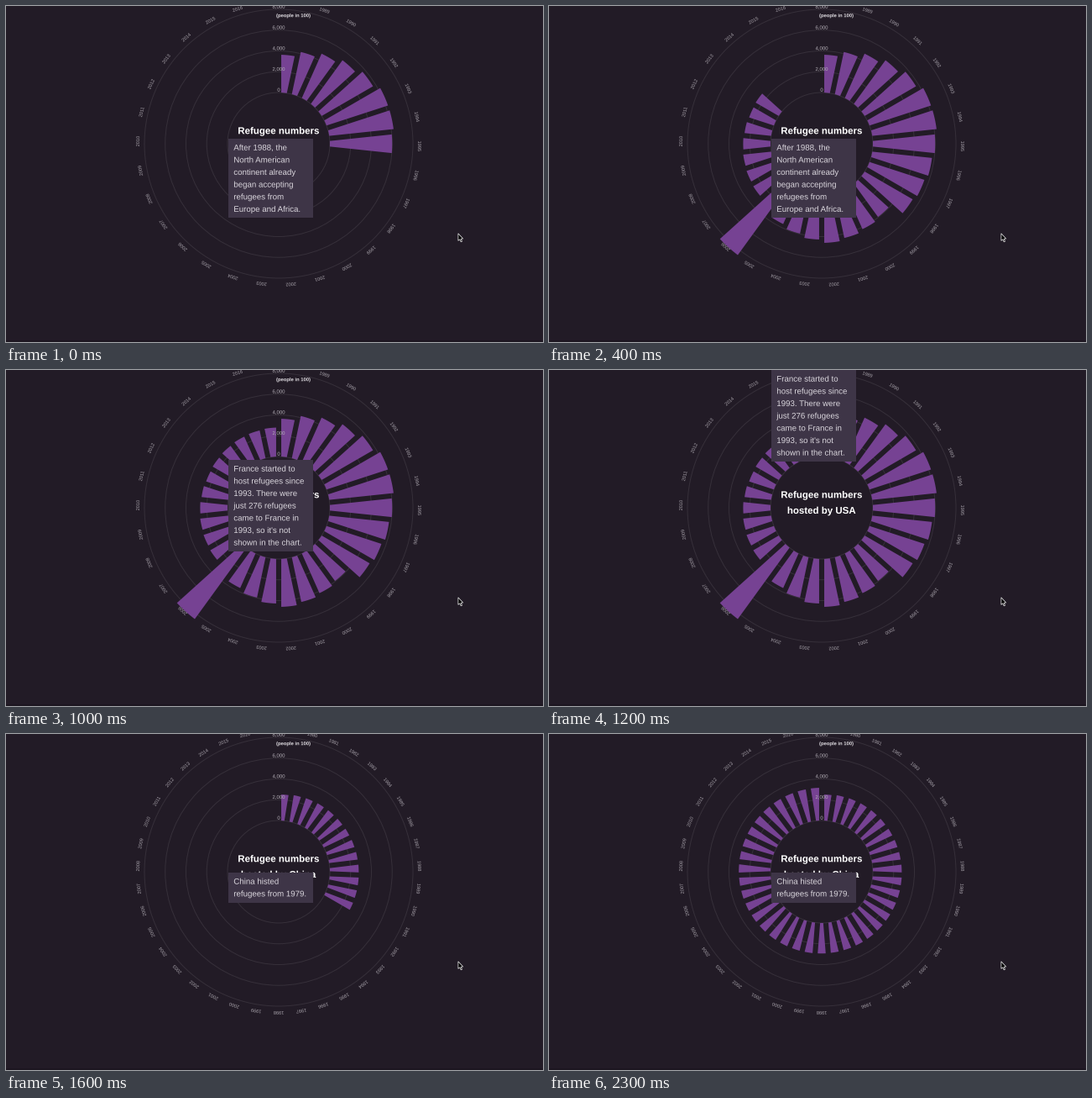
A matplotlib script that plays this animation: 640x400 px, repeating every 2400 ms.

```python
import numpy as np
import matplotlib.pyplot as plt
from matplotlib.animation import FuncAnimation
from matplotlib.patches import Circle, PathPatch, Polygon, Rectangle
from matplotlib.textpath import TextPath
from matplotlib.transforms import Affine2D

W, H, DPI = 640, 400, 100
FRAMES, STEP = 24, 100
SWITCH = 13                      # step at which the second chart takes over
RATE = 4.5                       # bars added per step
CX, CY = 325, 164
INNER, OUTER = 61, 160
PAD = 3.05                       # half the gap between neighbouring bars

BG, PURPLE, PANEL = "#221b26", "#764293", "#3e3547"

fig = plt.figure(figsize=(W / DPI, H / DPI), dpi=DPI, facecolor=BG)
ax = fig.add_axes([0, 0, 1, 1])
ax.set_xlim(0, W)
ax.set_ylim(H, 0)
ax.axis("off")


def px(n):
    return n * 72 / DPI


def polar(a, r):
    """Stage position for a clockwise angle from twelve o'clock."""
    return CX + r * np.sin(a), CY - r * np.cos(a)


def label(x, y, s, size, color, z, weight="normal", angle=0, left=False,
          move=Affine2D()):
    """Text as outlines, so that it can sit and turn between whole pixels."""
    path = TextPath((0, 0), s, size=size,
                    prop={"family": "Liberation Sans", "weight": weight})
    box = path.get_extents()
    shift = 0 if left else -(box.x0 + box.x1) / 2
    place = Affine2D().translate(shift, 0).scale(1, -1).rotate(angle)
    place.translate(x, y)
    return ax.add_patch(PathPatch(path, fc=color, lw=0, zorder=z,
                                  transform=place + move + ax.transData))


def bar(a0, a1, r):
    edge = []
    for rad, flip in ((INNER, 1), (r, -1)):
        pad = np.arcsin(PAD / rad)
        edge.append(np.column_stack(
            polar(np.linspace(a0 + pad, a1 - pad, 8)[::flip], rad)))
    return ax.add_patch(Polygon(np.vstack(edge), fc=PURPLE, lw=0, zorder=2))


class Chart:
    def __init__(self, country, first, radii, shift):
        band = 2 * np.pi / len(radii)
        self.bars = [bar(i * band, (i + 1) * band, r)
                     for i, r in enumerate(radii)]
        self.fixed = [label(CX, 171, f"hosted by {country}", 11.5, "white", 5,
                            weight="bold")]
        for i in range(len(radii)):
            a = (i + 0.5) * band + np.radians(shift)
            self.fixed.append(label(*polar(a, 166), str(first + i), 5.6,
                                    "#a6a1a9", 4, angle=a))

    def show(self, on, count):
        for art in self.fixed:
            art.set_visible(on)
        for i, b in enumerate(self.bars):
            b.set_visible(on and i < count)


class Note:
    LINE = 14.65

    def __init__(self, offset, text):
        self.offset = offset
        self.move = Affine2D()
        lines = text.split("\n")
        ax.add_patch(Rectangle(
            (265, 0), 101, len(lines) * self.LINE + 6.3, fc=PANEL, lw=0,
            zorder=6, transform=self.move + ax.transData))
        for i, s in enumerate(lines):
            label(271.3, 13.7 + i * self.LINE, s, 9.7, "#dad6dd", 7,
                  left=True, move=self.move)

    def scroll(self, y):
        self.move.clear().translate(0, y + self.offset)


# Radial axis
for v in range(0, 8001, 2000):
    r = INNER + (OUTER - INNER) * v / 8000
    ax.add_patch(Circle((CX, CY), r, fill=False, ec="white", alpha=0.09,
                        lw=px(1), zorder=1))
    label(CX, CY - r - 1.2, f"{v:,}", 6, "#b4afb7", 4)
label(342.5, 13.2, "(people in 100)", 5.85, "#e2dfe4", 4, weight="bold")
label(CX, 152.3, "Refugee numbers", 11.5, "white", 5, weight="bold")
ax.add_patch(Rectangle((0, 398), W, 2, fc="#1c1620", lw=0))

# Mouse pointer
ARROW = [(0, 0), (0, 8.6), (1.9, 7), (3.3, 10), (4.6, 9.4), (3.3, 6.5),
         (5.8, 6.2)]
ax.add_patch(Polygon(np.array(ARROW) + (538.9, 270.8), fc="black",
                     ec="#dddddd", lw=px(0.8), zorder=9))

# Bar ends: a few turning points for one country, a slow rise for the other
usa_ends = np.interp(range(30), [0, 5, 6, 10, 11, 14, 17, 18, 19, 24, 29],
                     [106, 138, 138, 127, 110, 118, 106, 166, 96, 92, 95.5])
china_ends = 92 + 8 * np.linspace(0, 1, 39) ** 0.6

usa = Chart("USA", 1988, usa_ends, 1)
china = Chart("China", 1979, china_ends, 0)
notes = [
    Note(-345, "After 1988, the\nNorth American\ncontinent already\n"
               "began accepting\nrefugees from\nEurope and Africa."),
    Note(0, "France started to\nhost refugees since\n1993. There were\n"
            "just 276 refugees\ncame to France in\n1993, so it's not\n"
            "shown in the chart."),
    Note(400, "China histed\nrefugees from 1979."),
]


def update(k):
    second = k >= SWITCH
    usa.show(not second, int(8 + RATE * k))
    china.show(second, int(RATE * (k - SWITCH)))
    y = np.interp(k, [5, 6, 7, 10, 12, 14, 15],
                  [503, 403, 233, 107, 0, -232, -235])
    for note in notes:
        note.scroll(y)
    return []


anim = FuncAnimation(fig, update, frames=FRAMES, interval=STEP, repeat=True,
                     repeat_delay=0, blit=False)
plt.show()
```
